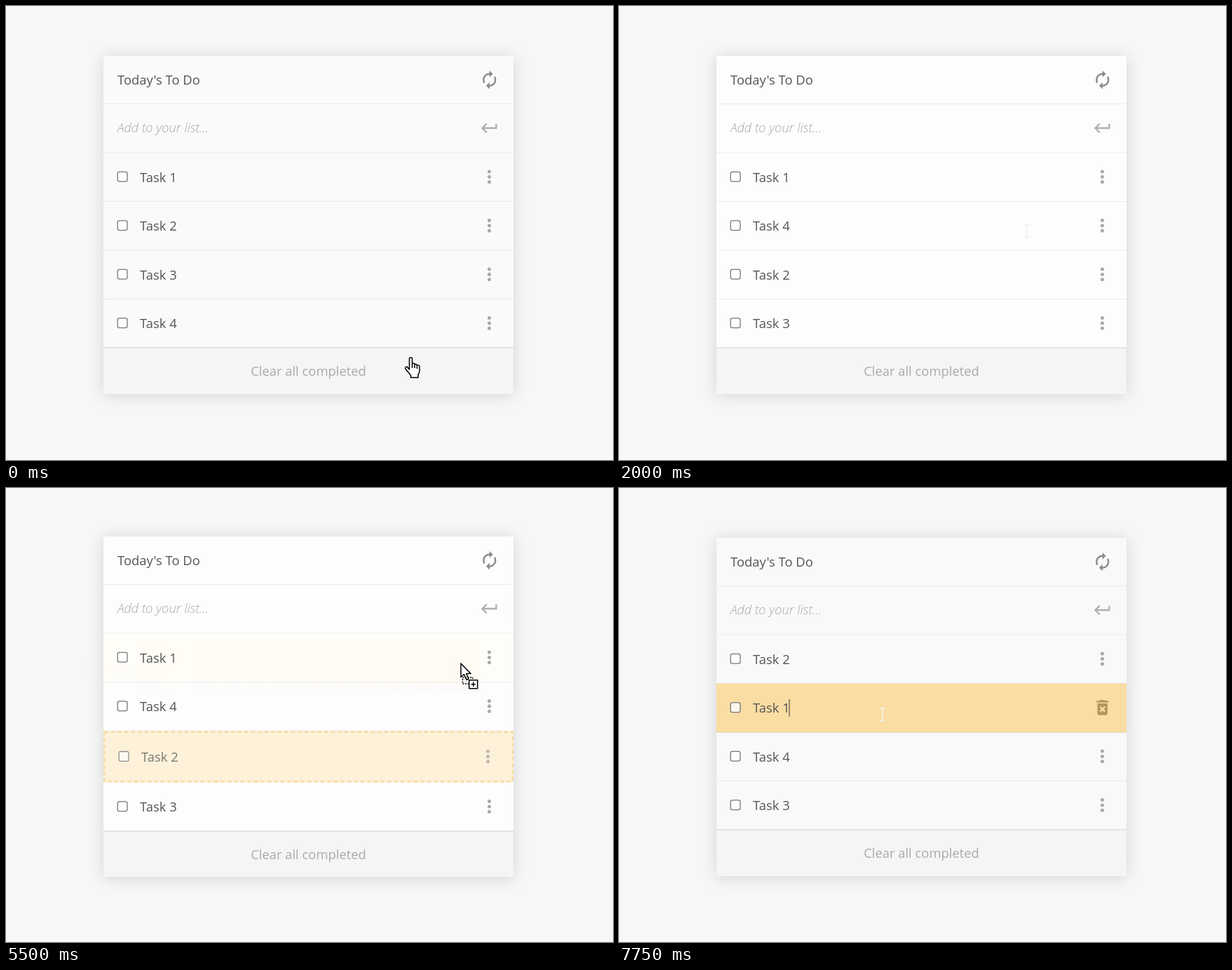
Write an HTML page that moves like this. It is 866 by 647 pixels and loops after 8000 ms.

```html
<!DOCTYPE html>
<html lang="en">
<head>
<meta charset="utf-8">
<title>To do list</title>
<style>
  html, body { margin: 0; width: 100%; height: 100%; overflow: hidden; background: #f7f7f7; }
  svg { display: block; width: 100%; height: 100%; }
  text { font: 18.4px "Open Sans", sans-serif; fill: #555; }
  .hint { font-style: italic; font-weight: 300; fill: #a8a8a8; }
  .clear { fill: #aaa; text-anchor: middle; }
  .line { stroke: #ebebeb; }
  .panel { filter: drop-shadow(0 2px 11px rgba(0, 0, 0, .14)); }
  .cursor { fill: #fff; stroke: #000; stroke-width: 1.5; stroke-linejoin: round; }
</style>
</head>
<body>
<svg id="stage" viewBox="0 0 866 647"></svg>
<script>
const STEP = 250, LOOP = 8000, ROW = 69.5, LEFT = 139, WIDTH = 585;
const stage = document.getElementById('stage');

const icons = {
  renew: 'M12 6v3l4-4-4-4v3c-4.42 0-8 3.58-8 8 0 1.57.46 3.03 1.24 4.26L6.7 14.8c-.45-.83-.7-1.79-.7-2.8 0-3.31 2.69-6 6-6zm6.76 1.74L17.3 9.2c.44.84.7 1.79.7 2.8 0 3.31-2.69 6-6 6v-3l-4 4 4 4v-3c4.42 0 8-3.58 8-8 0-1.57-.46-3.03-1.24-4.26z',
  enter: 'M19 7v4H5.83l3.58-3.59L8 6l-6 6 6 6 1.41-1.41L5.83 13H21V7z',
  trash: 'M6 19c0 1.1.9 2 2 2h8c1.1 0 2-.9 2-2V7H6zm2.46-7.12 1.41-1.41L12 12.59l2.12-2.12 1.41 1.41L13.41 14l2.12 2.12-1.41 1.41L12 15.41l-2.12 2.12-1.41-1.41L10.59 14zM15.5 4l-1-1h-5l-1 1H5v2h14V4z'
};

const arrow = '<path d="M0 0V19.5L4.5 15.5 8 23.5 11 22 7.7 14.5H14Z"/>';
const cursors = {
  arrow,
  hand: `<path transform="translate(-8 -1)" d="M6.5 2.5C6.5.5 10.5.5 10.5 2.5V10C11 8.8 14 9 14 11 14.8 9.8 17.4 10.3 17.4 12.2
    18.5 11.2 21 11.8 21 14V20C21 23 19 24 19 26V29.5H8.5V26.5C6 23 3 20 1 17-.3 15 2.5 13 4 15L6.5 18ZM10.5 10v6M14 11v5M17.4 12v5"/>`,
  move: '<path d="M0-14l5 6h-3v6h6v-3l6 5-6 5v-3h-6v6h3l-5 6-5-6h3v-6h-6v3l-6-5 6-5v3h6v-6h-3z"/>',
  no: '<circle r="9.3" stroke-width="3"/><path d="M-6.5-6.5 6.5 6.5" stroke-width="3.4"/>',
  copy: arrow + `<path d="M2.5 20h14v9h-14z" fill="none" stroke-dasharray="2 1.5"/>
    <path d="M11.7 23.7h12v12h-12zM14.5 29.7h6.4M17.7 26.5v6.4"/>`,
  beam: '<path d="M-4-9h3l1 1 1-1h3M0-8V8M-4 9h3l1-1 1 1h3" fill="none" stroke="#f1f0ec"/>'
};

// Pointer poses: step, shape, x, y; each holds until the next.
const pointer = [
  [0, 'hand', 577, 501], [1, 'hand', 610, 492], [2, 'move', 660, 465], [3, 'move', 678, 448],
  [4, 'no', 645, 420], [5, 'copy', 597, 378], [6, 'copy', 558, 322], [7, 'arrow', 560, 320],
  [8, 'beam', 582, 321], [9, 'beam', 452, 378], [12, 'beam', 500, 365], [13, 'beam', 560, 362],
  [14, 'beam', 620, 372], [15, 'move', 690, 388], [16, 'move', 716, 401], [17, 'move', 706, 390],
  [18, 'move', 699, 377], [19, 'no', 697, 370], [20, 'no', 693.5, 359.5], [21, 'copy', 675, 310],
  [22, 'copy', 649, 250], [23, 'arrow', 620, 252], [24, 'arrow', 588, 263], [25, 'arrow', 560, 280],
  [26, 'beam', 500, 300], [27, 'beam', 420, 318], [28, 'beam', 376, 323]
];

const drags = [
  { from: 4, to: 6, row: 3, grab: [678, 448] },
  { from: 19, to: 22, row: 2, grab: [699, 377] }
];

const text = (x, y, s, cls = '') => `<text x="${x}" y="${y}" class="${cls}">${s}</text>`;
const line = y => `<path class="line" d="M${LEFT} ${y}h${WIDTH}"/>`;
const rect = (y, h, fill, more = '') =>
  `<rect x="${LEFT}" y="${y}" width="${WIDTH}" height="${h}" fill="${fill}" ${more}/>`;
const icon = (name, y, fill) =>
  `<path transform="translate(675.4 ${y - 14.4}) scale(1.2)" d="${icons[name]}" fill="${fill}"/>`;
const dots = (x, y) => [-7.3, 0, 7.3].map(d =>
  `<circle cx="${x}" cy="${y + d}" r="2.5" fill="#a9a9a9"/>`).join('');

function item(n, y, inset = 0, editing = false) {
  return `<rect x="${159.2 + inset}" y="${y - 7}" width="13.8" height="13.8" rx="2.6"
      fill="#fff" fill-opacity=".8" stroke="#777" stroke-width="1.3"/>` +
    text(191 + inset, y + 7.5, 'Task ' + n) +
    (editing ? icon('trash', y, '#b59660') : dots(689.5 - inset, y));
}

const dashed = (y, fill) => rect(y, 73, fill) +
  `<rect x="${LEFT + 1.2}" y="${y + 1.2}" width="${WIDTH - 2.4}" height="70.6" fill="none"
    stroke="#f7dca2" stroke-width="2.4" stroke-dasharray="6 3.5"/>`;

function ghost(n, top, [gx, gy], x, y) {
  return `<defs>
      <radialGradient id="fade" gradientUnits="userSpaceOnUse" r="1"
        gradientTransform="translate(${gx} ${gy}) scale(370 52)">
        <stop stop-color="#fff" stop-opacity=".7"/>
        <stop offset=".4" stop-color="#fff" stop-opacity=".38"/>
        <stop offset="1" stop-color="#fff" stop-opacity=".06"/>
      </radialGradient>
      <radialGradient id="end" gradientUnits="userSpaceOnUse" cx="${gx}" cy="${gy}" r="520">
        <stop stop-color="#fff"/><stop offset=".7" stop-color="#fff" stop-opacity=".25"/>
        <stop offset="1" stop-color="#fff" stop-opacity=".12"/>
      </radialGradient>
      <mask id="soft" maskUnits="userSpaceOnUse" x="0" y="0" width="866" height="647">
        ${rect(top, 73, 'url(#fade)')}
      </mask>
      <mask id="side" maskUnits="userSpaceOnUse" x="0" y="0" width="866" height="647">
        ${rect(top, 73, 'url(#end)')}
      </mask>
    </defs>
    <g transform="translate(${x - gx} ${y - gy})"><g mask="url(#side)"><g mask="url(#soft)">
      ${dashed(top, '#fbe3b4')}${item(n, top + 36, 2)}
    </g></g></g>`;
}

function draw(step) {
  const [, shape, x, y] = pointer.findLast(p => p[0] <= step);
  const drag = drags.find(d => step >= d.from && step <= d.to);
  const order = step < 7 ? '1234' : step < 23 ? '1423' : '2143';
  const editing = step >= 28;
  const up = drag ? -2 : 0;
  const foot = 487 - up, bottom = drag ? 554 : 553;
  const rowTop = i => 209 + ROW * i + (drag && i > drag.row ? 2 : up);
  const paper = step === 0 ? '#fafafa' : editing ? '#f9f9f9' : '#fdfdfd';

  let out = rect(71 + up, bottom - 71 - up, paper, 'class="panel"') +
    rect(foot, bottom - foot, '#f5f5f5') +
    text(159, 112 + up, "Today's To Do") + icon('renew', 105.2 + up, '#8a8a8a') +
    text(159, 180.3 + up, 'Add to your list...', 'hint') + icon('enter', 174 + up, '#b0b0b0') +
    line(139.5 + up) + line(209 + up);

  [...order].forEach((n, i) => {
    const top = rowTop(i), mid = top + 34.4;
    if (drag && i === drag.row) {
      out += dashed(top + .5, '#fdf1da') + `<g opacity=".78">${item(n, top + 36.5, 2)}</g>`;
      return;
    }
    const active = editing && i === 1;
    const over = drag && shape === 'copy' && y >= top && y < top + ROW;
    if (over) out += rect(top, ROW, '#fffdf7');
    if (active) {
      out += rect(top, ROW, '#fadda2', `opacity="${step === 28 ? .5 : 1}"`) +
        `<path d="M${LEFT} ${top + ROW}h${WIDTH}" stroke="#e6cd98"/>`;
      if (step !== 30) out += `<path d="M243 ${mid - 12}v25" stroke="#555" stroke-width="1.2"/>`;
    } else if (i < 3) out += line(top + ROW);
    out += item(n, mid, 0, active);
  });

  if (!drag || drag.row < 3)
    out += `<path d="M${LEFT} ${foot}h${WIDTH}" stroke="#e4e4e4" stroke-width="1.8"/>`;
  out += text(431.5, 527 - up, 'Clear all completed', 'clear');
  if (drag) out += ghost(order[drag.row], rowTop(drag.row) + .5, drag.grab, x, y);
  stage.innerHTML = out + `<g class="cursor" transform="translate(${x} ${y})">${cursors[shape]}</g>`;
}

let shown = -1;
const start = performance.now();
function tick() {
  const step = Math.floor((performance.now() - start) % LOOP / STEP);
  if (step !== shown) draw(shown = step);
  requestAnimationFrame(tick);
}
tick();
</script>
</body>
</html>
```
